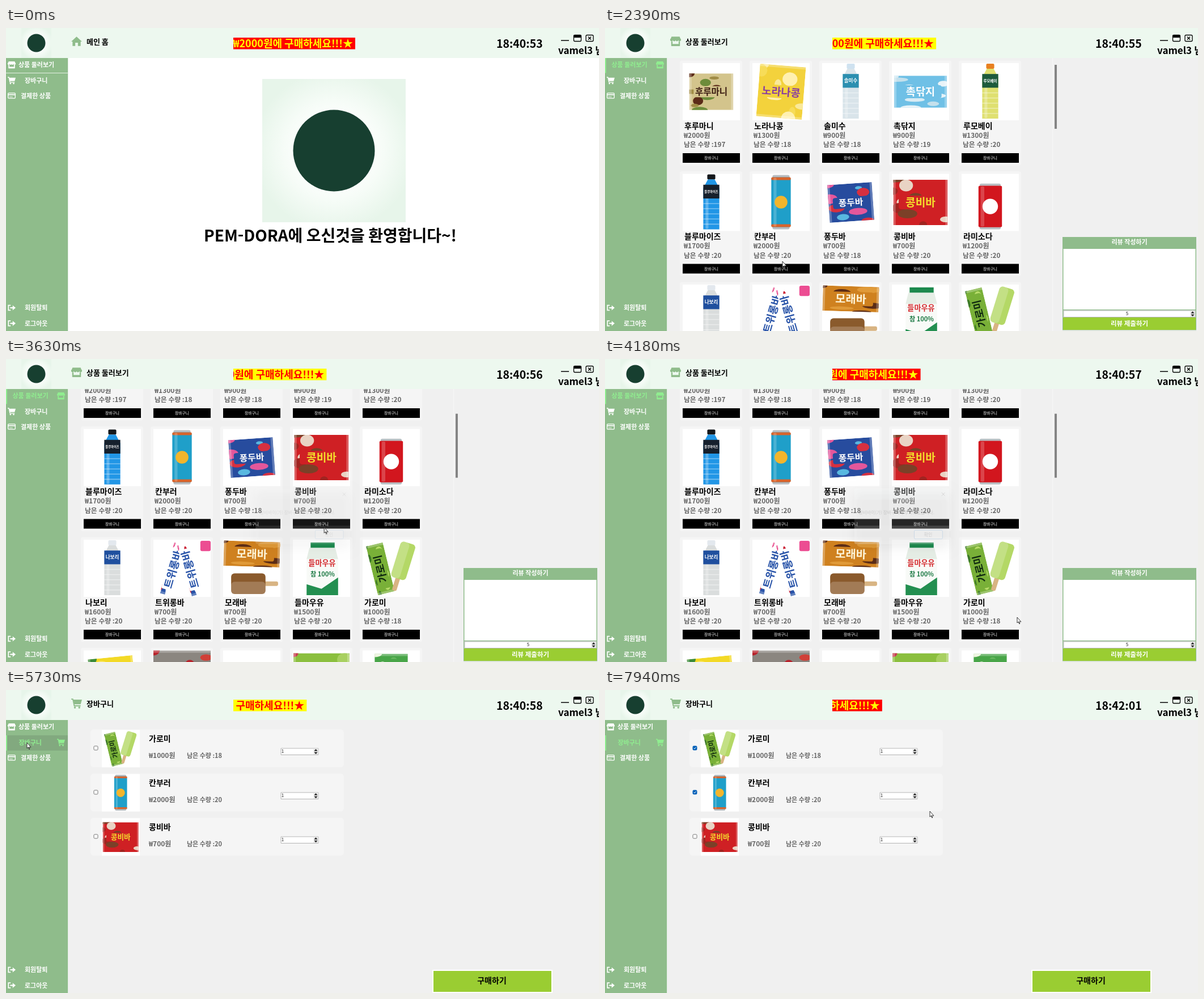
These frames come from a looping animation (1046x535 px, 8000 ms). An HTML page with a canvas:

```html
<!DOCTYPE html>
<html lang="ko">
<head>
<meta charset="utf-8">
<title>Shop</title>
<style>
html,body{margin:0;width:100%;height:100%;overflow:hidden;background:#fff}
canvas{display:block}
</style>
</head>
<body>
<canvas id="stage" width="1046" height="535"></canvas>
<script>
const g = document.getElementById('stage').getContext('2d');
const LOOP = 8000, SAGE = '#8fbc8b', DARK = '#173f30', LIME = '#9acd32', MINT = '#90ee90', GREY = '#f0f0f0', CARD = '#f5f5f5';
const OPEN_STORE = 960, OPEN_CART = 5250, GROW = 320;
const ramp = (t, a, b) => Math.max(0, Math.min(1, (t - a) / (b - a)));
const ease = p => p * p * (3 - 2 * p);

// drawing helpers
function box(c, x, y, w, h, r = 0) {
  g.fillStyle = c; g.beginPath(); g.roundRect(x, y, w, h, r); g.fill();
}
function frame(c, x, y, w, h, r = 0, lw = 1) {
  g.strokeStyle = c; g.lineWidth = lw; g.beginPath(); g.roundRect(x, y, w, h, r); g.stroke();
}
function path(p) {
  g.beginPath();
  for (let i = 0; i < p.length; i += 2) g.lineTo(p[i], p[i + 1]);
}
function poly(c, ...p) { path(p); g.fillStyle = c; g.fill(); }
function line(c, lw, ...p) { path(p); g.strokeStyle = c; g.lineWidth = lw; g.stroke(); }
function dot(c, x, y, rx, ry = rx) {
  g.fillStyle = c; g.beginPath(); g.ellipse(x, y, rx, ry, 0, 0, 7); g.fill();
}
function cross(c, x, y, r, lw) {
  line(c, lw, x - r, y - r, x + r, y + r); line(c, lw, x - r, y + r, x + r, y - r);
}
function text(s, x, y, size, c = '#000', weight = 700, align = 'left') {
  g.font = `${weight} ${size}px "Noto Sans CJK KR","Noto Sans CJK",sans-serif`;
  g.fillStyle = c; g.textAlign = align; g.fillText(s, x, y + size * .37);
}
const label = (s, x, y, size, c, weight = 700) => text(s, x, y, size, c, weight, 'center');
function at(x, y, k, fn, turn = 0) {
  g.save(); g.translate(x, y); g.rotate(turn); g.scale(k, k); fn(); g.restore();
}
function clip(x, y, w, h, fn) {
  g.save(); g.beginPath(); g.rect(x, y, w, h); g.clip(); fn(); g.restore();
}

// icons on a 16 x 16 grid
const wheels = c => [5.5, 12].forEach(x => dot(c, x, 14.3, 1.5));
const ICONS = {
  home(c) { poly(c, 8, 1, 0, 8.5, 2, 8.5, 2, 15, 6, 15, 6, 10, 10, 10, 10, 15, 14, 15, 14, 8.5, 16, 8.5); },
  store(c) {
    poly(c, 2, 1, 14, 1, 16, 6, 0, 6);
    for (let x = 2; x < 16; x += 4) dot(c, x, 5.8, 2.1);
    line(c, 2, 2.5, 8, 2.5, 14, 13.5, 14, 13.5, 8); box(c, 2, 12, 12, 3);
  },
  cart(c) { poly(c, 3, 2.5, 16, 2.5, 14, 9.5, 4.5, 9.5); line(c, 1.5, 0, 1.7, 2.4, 1.7, 4.6, 11.8, 14, 11.8); wheels(c); },
  card(c) { frame(c, .8, 2.8, 14.4, 10.4, 1.5, 1.5); line(c, 2, 1, 6, 15, 6); line(c, 1, 3, 10.5, 10, 10.5); },
  out(c) { line(c, 2, 6, 3, 1.5, 3, 1.5, 13, 6, 13); poly(c, 10, 3, 16, 8, 10, 13); box(c, 5, 6.8, 6, 2.5); }
};
const icon = (k, x, y, size, c) => at(x, y, size / 16, () => ICONS[k](c));

// product pictures, each in a 100 x 100 box
function pack(name, w, h, body, blobs, ink, turn = 0, x = 50, y = 50) {
  let seed = w * 7 + h;
  const rnd = () => (seed = seed * 16807 % 2147483647) / 2147483647;
  at(x, y, 1, () => clip(-w / 2, -h / 2, w, h, () => {
    box(body, -w / 2, -h / 2, w, h);
    for (let i = 0; i < 9; i++) {
      dot(blobs[i % blobs.length], (rnd() - .5) * w, (i / 8 - .5) * h, w * (.07 + rnd() * .15), h * (.04 + rnd() * .1));
    }
    for (const s of [-1, 1]) {
      if (w > h) box('#ffffff44', s * (w / 2 - 2) - 2, -h / 2, 4, h);
      else box('#ffffff44', -w / 2, s * (h / 2 - 2) - 2, w, 4);
    }
    const long = Math.max(w, h), size = long * .8 / Math.max(4, name.length);
    at(0, 0, 1, () => {
      box(body, -long * .4, -size * .62, long * .8, size * 1.24, 4);
      label(name, 0, 0, size, ink, 900);
    }, h > 1.3 * w ? -Math.PI / 2 : 0);
  }), turn);
}
function bottle(name, cap, body, wrap) {
  box(cap, 43, 1, 14, 9, 2);
  poly(body, 44, 10, 56, 10, 64, 25, 64, 97, 36, 97, 36, 25);
  for (let y = 52; y < 96; y += 9) line('#ffffff66', 1.5, 36, y, 64, y);
  box('#ffffff44', 40, 22, 5, 74, 2);
  box(wrap, 36, 19, 28, 24);
  label(name, 50, 31, 28 / (name.length + .3), '#fff', 900);
}
function can(body, w, h, trim, mark) {
  const x = 50 - w / 2, y = 97 - h;
  box('#b9bec2', x + 2, y, w - 4, h, 3);
  box(body, x, y + 4, w, h - 8, 4);
  for (const ty of [y + 4, y + h - 9]) box(trim, x, ty, w, 5, 2);
  box('#ffffff33', x + 4, y + 5, w * .15, h - 10, 2);
  dot(mark, 50, y + h / 2, w * .33);
}
function lolly(c, turn, x, y, w, h) {
  at(x, y, 1, () => {
    box('#d8b483', -4, h / 2 - 4, 8, 26, 3);
    box(c, -w / 2, -h / 2, w, h, 6);
    box('#ffffff33', -w / 2, -h / 2, w * .6, h, 6);
  }, turn);
}
function carton(name) {
  box('#1d8a4e', 31, 5, 42, 10); poly('#e6eee6', 29, 14, 74, 14, 79, 34, 24, 34);
  box('#f8faf7', 24, 34, 55, 63); poly('#238f50', 24, 78, 50, 86, 79, 66, 79, 97, 24, 97);
  label(name, 51, 41, 13, '#d42a2e', 900);
  label('참 100%', 52, 60, 11, '#1d7a45');
}

const goods = [
  ['후루마니', 2000, 197, n => pack(n, 77, 64, '#d3c48c', ['#5b2a18', '#a08c46', '#6d8c3a'], '#3b1c12')],
  ['노라나콩', 1300, 18, n => pack(n, 80, 92, '#f3d23c', ['#fae99a', '#f7dc58', '#fff0b0'], '#8a3fa0', .08)],
  ['솔미수', 900, 18, n => bottle(n, '#cfe2f0', '#d9e4ea', '#2b8fb0')],
  ['촉닦지', 900, 19, n => pack(n, 92, 56, '#6fc0e6', ['#d9ecf4', '#c4e0ec', '#e8f3f8'], '#fff')],
  ['루모베이', 1300, 20, n => bottle(n, '#e88020', '#dfe070', '#1d5a3c')],
  ['블루마이즈', 1700, 20, n => bottle(n, '#15181c', '#2196e6', '#16202c')],
  ['칸부러', 2000, 20, () => can('#1f9fc9', 34, 95, '#d8642c', '#f2b52c')],
  ['퐁두바', 700, 18, n => pack(n, 78, 66, '#274c9e', ['#e4579b', '#58b8e0', '#d63040'], '#fff', -.07)],
  ['콩비바', 700, 20, n => pack(n, 95, 79, '#cf2024', ['#7b4028', '#e9d3c4', '#a02420'], '#f4dc2c')],
  ['라미소다', 1200, 20, () => can('#d2161e', 41, 80, '#d2161e', '#fff')],
  ['나보리', 1600, 20, n => bottle(n, '#e3e8ee', '#dadddd', '#1f4f9e')],
  ['트위롱바', 700, 20, n => {
    for (const s of [-1, 1]) pack(n, 21, 92, '#fff', ['#e84e8e', '#cc2438', '#2853a8'], '#2853a8', -s * .28, 49 + s * 15, 52);
    box('#ec4d92', 82, 2, 18, 18, 3);
  }],
  ['모래바', 700, 20, n => {
    pack(n, 98, 44, '#cf811f', ['#5b2c16', '#e09a38'], '#fff5d8', .03, 50, 25);
    lolly('#8a5a2c', -Math.PI / 2, 44, 77, 36, 60);
  }],
  ['들마우유', 1500, 20, carton],
  ['가로미', 1000, 18, n => {
    pack(n, 30, 88, '#79b038', ['#3c7a28', '#b8dc6a'], '#102a10', -.24, 31, 51);
    lolly('#b4d866', .3, 71, 37, 27, 65);
  }],
  ['보리콩', 900, 20, n => pack(n, 78, 76, '#f3d926', ['#3b8a3a', '#fae870'], '#333', -.1)],
  ['빨간알', 900, 20, n => pack(n, 100, 100, '#8b8680', ['#b8232c', '#d04038'], '#fff')],
  ['하얀결', 900, 20, () => {}],
  ['초록들', 900, 20, n => pack(n, 98, 90, '#8bbf3e', ['#c83e50', '#a8d060'], '#fff')],
  ['푸른솔', 900, 20, n => pack(n, 58, 88, '#48a548', ['#e9f2d8', '#6ab860'], '#fff')]
];
const [CAN, BAR, MELON] = [6, 8, 14].map(i => goods[i]);
const picture = (p, x, y, size) => clip(x, y, size, size, () => at(x, y, size / 100, () => p[3](p[0])));
const price = p => `₩${p[1]}원`, stock = p => `남은 수량 :${p[2]}`;

// cursor stops: time, x, y
const OK = [571, 311], CART_ITEM = [37, 93];
const STOPS = [[70, 330, 412], [850, 58, 66], [1150, 188, 133], [2390, 313, 412], [2600, 313, 417],
  [2950, ...OK], [3090, ...OK], [3160, 562, 383], [3520, 556, 290], [3800, ...OK], [4030, ...OK],
  [4180, 727, 456], [4350, 690, 481], [4690, ...OK], [5100, ...CART_ITEM], [5740, ...CART_ITEM],
  [6050, 157, 101], [6750, 157, 178], [7250, 300, 350], [7940, 573, 214]];
function mouseAt(t) {
  const i = STOPS.findIndex(s => s[0] > t);
  if (i < 1) return STOPS.at(i).slice(1);
  const a = STOPS[i - 1], b = STOPS[i], p = ease(ramp(t, a[0], b[0]));
  return [1, 2].map(j => a[j] + (b[j] - a[j]) * p);
}

function logo(x, y, size, r) {
  const m = size / 2, rg = g.createRadialGradient(x + m, y + m, 0, x + m, y + m, size * .56);
  rg.addColorStop(.35, '#fff'); rg.addColorStop(.62, '#f6fcf7'); rg.addColorStop(1, '#e7f5ea');
  box(rg, x, y, size, size);
  dot(DARK, x + m, y + m, r);
}

function header(t, opened) {
  box('#edf8ef', 0, 0, 1046, 53);
  logo(27, 0, 53, 16);
  const [k, s] = opened < 0 ? ['home', '메인 홈'] : MENU[opened];
  icon(k, 115, 14, 19, SAGE);
  text(s, 142, 24.5, 13);

  const sec = t / 1000, right = 616 - 12.2 * sec - .48 * sec * sec;
  const colors = (sec + .7) % 1 < .5 ? ['#ff0', '#f00'] : ['#f00', '#ff0'];
  clip(401, 17, 400, 20.5, () => {
    box(colors[0], 401, 17, right - 401, 21);
    text('₩2000원에 구매하세요!!!★', right - 4, 27, 18, colors[1], 700, 'right');
  });

  const clock = new Date(Date.UTC(2000, 0, 1, 18, 40, 53.18 + sec));
  clock.setUTCSeconds(53 + Math.floor(sec + .18));
  text(clock.toISOString().slice(11, 19), 865, 28, 19.5);
  text('vamel3 님', 974, 40, 17);
  line('#000', 1.5, 979, 22, 993, 22);
  for (const x of [1001.5, 1023]) frame('#000', x, 12.5, 13, 11, 2, 1.3);
  box('#000', 1001, 12, 14, 5, 2);
  cross('#000', 1029.5, 18, 2.5, 1.5);
}

const MENU = [['store', '상품 둘러보기', 22, 65], ['cart', '장바구니', 33, 92.5], ['card', '결제한 상품', 26, 119.5],
  ['out', '회원탈퇴', 33, 494], ['out', '로그아웃', 33, 521.5]];
function sidebar(t, opened, [mx, my]) {
  box('#e3ece3', 109, 53, 1, 482);
  box(SAGE, 0, 53, 109, 482);
  const active = t < 1080 ? -1 : t < 5230 ? 0 : 1;
  if (active < 0) line('#e4f0e3', 1, 0, 79.5, 109, 79.5);
  MENU.forEach(([k, s, x, y], i) => {
    const hover = t >= 70 && mx < 109 && Math.abs(my - y) < 13.5, on = i === opened;
    if (hover || i === active && !on) box('#82a97f', 0, y - 12.5, 109, 27);
    if (i === active) box(MINT, 0, y - 12.5, 2, 27);
    const c = on ? MINT : '#fff';
    icon(k, on ? 90 : 3, y - 7, 14, c);
    text(s, on ? x - 10.5 : x, y, 11, c);
  });
}

function home() {
  box('#fff', 110, 53, 936, 482);
  logo(452, 90, 253, 72);
  label('PEM-DORA에 오신것을 환영합니다~!', 572, 367, 28);
}

function spinner(x, y, w, h, s, sx) {
  box('#fff', x, y, w, h); frame('#b4b4b4', x + .5, y + .5, w - 1, h - 1);
  const cx = x + w - 5, m = y + h / 2;
  label(s, sx, m - .5, 8, '#222', 400);
  box('#e8e8e8', cx - 4, y + 1, 8, h - 2);
  for (const d of [-1, 1]) poly('#222', cx - 3, m + d, cx + 3, m + d, cx, m + d * 4.5);
}

// calls fn with the top left corner of each card
function grid(count, cols, fn) {
  for (let i = 0; i < count; i++) fn(132 + i % cols * 123, 57.5 + Math.floor(i / cols) * 195.5, i);
}
function card(p, x, y) {
  box(CARD, x, y, 110, 185, 4);
  box('#fff', x + 5, y + 4.5, 101, 101);
  picture(p, x + 5, y + 4.5, 101);
  text(p[0], x + 8, y + 115, 14);
  text(price(p), x + 7, y + 132, 12, '#666');
  text(stock(p), x + 7, y + 148.5, 11.8, '#666');
  box('#000', x + 5, y + 163.5, 101, 17);
  label('장바구니', x + 55.5, y + 172, 6.8, '#fff', 500);
}

function store(t) {
  const scroll = 134 * ramp(t, 3270, 3355);
  box(GREY, 110, 53, 936, 482);
  clip(110, 53, 680, 482, () => grid(goods.length, 5, (x, y, i) => card(goods[i], x, y - scroll)));
  line(CARD, 1.5, 789.5, 53, 789.5, 535);
  box('#858585', 793, 65 + scroll * .236, 4, 113);
  box(SAGE, 807, 369, 236, 164.5);
  label('리뷰 작성하기', 925, 378, 11, '#fff');
  box('#fff', 808.5, 390, 233, 107);
  spinner(808.5, 498.5, 233, 12.5, '5', 921);
  box(LIME, 808, 511, 234, 22);
  label('리뷰 제출하기', 925, 521.5, 11.5, '#fff');
}

// page window growing out of its top left corner
function grown(t, start, fn) {
  const p = ramp(t, start, start + GROW), w = 936 * p, h = 482 * p ** .87;
  clip(110, 53, w, h, () => fn(w, h));
}
function skeleton(w, h) {
  box(GREY, 110, 53, w, h);
  const cols = Math.max(1, Math.floor((w * .715 - 22) / 123));
  grid(cols * 3, cols, (x, y) => {
    box(CARD, x, y, 110, 185, 4);
    for (const [dy, dh] of [[5, 100], [107, 51], [163, 17]]) box(GREY, x + 5, y + dy, 101, dh);
  });
  box('#f3f3f3', 110, 53, 113, 185, 5);
  const x = 110 + w * .746, y = 53 + h * .656, pw = w * .245, ph = h * .335;
  line(CARD, 1.5, x - w * .031, 53, x - w * .031, 535);
  box('#858585', x - w * .024, 65, 4, h * .24 - 26);
  box(SAGE, x, y, pw, ph);
  box('#fff', x + 2, y + ph * .11, pw - 4, ph * .53);
}

function checkbox(x, y, on) {
  box(on ? '#005fb8' : '#fff', x, y, 7, 7, 1.5);
  frame(on ? '#005fb8' : '#666', x, y, 7, 7, 1.5, .9);
  if (on) line('#fff', 1, x + 1.5, y + 3.6, x + 3, y + 5, x + 5.6, y + 2);
}
function cart(t) {
  box(GREY, 110, 53, 936, 482);
  [MELON, CAN, BAR].forEach((p, i) => {
    const y = 69.5 + i * 78;
    box(CARD, 149, y, 447, 67, 6);
    box('#fff', 169, y + 1, 67, 66);
    picture(p, 169, y + 1, 66.5);
    checkbox(155, y + 29.5, i < 2 && t >= 6300 + i * 550);
    text(p[0], 252, y + 16, 14);
    text(price(p), 252, y + 46.5, 12, '#666');
    text(stock(p), 319, y + 46.5, 11, '#666');
    spinner(484.5, y + 33, 67, 12.5, '1', 488);
  });
  box('#fff', 752, 494, 212, 41);
  box(LIME, 754, 496, 208, 37);
  label('구매하기', 857, 513, 14);
}

function alertBox(t, [p, open, close]) {
  const a = Math.min(ramp(t, open, open + 130), 1 - ramp(t, close, close + 160));
  if (a <= 0) return;
  g.globalAlpha = a;
  at(523.5, 277.5, .95 + .05 * a, () => {
    g.shadowColor = '#0006'; g.shadowBlur = 18; g.shadowOffsetY = 7;
    box('#fff', -87.5, -51.5, 175, 103, 4);
    g.shadowColor = 'transparent';
    box('#edf3f4', -87.5, -51.5, 175, 21, [4, 4, 0, 0]);
    box(GREY, -87.5, 17.5, 175, 34, [0, 0, 4, 4]);
    cross('#333', 76.5, -40.5, 3, 1);
    text(`${p[0]}이(가) 장바구니에 추가되었습니다.`, -79.5, -6.5, 8.2, '#222', 400);
    box('#fdfdfd', 22.5, 25.5, 53, 17, 2); frame('#0067c0', 23, 26, 52, 16, 2);
    label('확인', 48.5, 34, 8.5, '#222', 400);
  });
  g.globalAlpha = 1;
}

const ARROW = new Path2D('M0 0v10l2-2 2 4 1-1-2-3h4z');
function pointer([x, y]) {
  at(x, y, 1, () => {
    g.fillStyle = '#fff'; g.fill(ARROW);
    g.strokeStyle = '#222'; g.lineWidth = .9; g.stroke(ARROW);
  });
}

function draw(now) {
  const t = now % LOOP, mouse = mouseAt(t);
  const opened = t < OPEN_STORE + GROW ? -1 : t < OPEN_CART + GROW / 2 ? 0 : 1;
  if (t < 1370) {
    home();
    grown(t, OPEN_STORE, skeleton);
  } else store(t);
  grown(t, OPEN_CART, () => cart(t));
  sidebar(t, opened, mouse);
  header(t, opened);
  // product, opens, starts closing
  [[CAN, 2640, 3110], [BAR, 3620, 4045], [MELON, 4440, 4740]].forEach(a => alertBox(t, a));
  if (t >= 70) pointer(mouse);
}
const start = performance.now();
(function tick() {
  draw(performance.now() - start);
  requestAnimationFrame(tick);
})();
</script>
</body>
</html>
```
